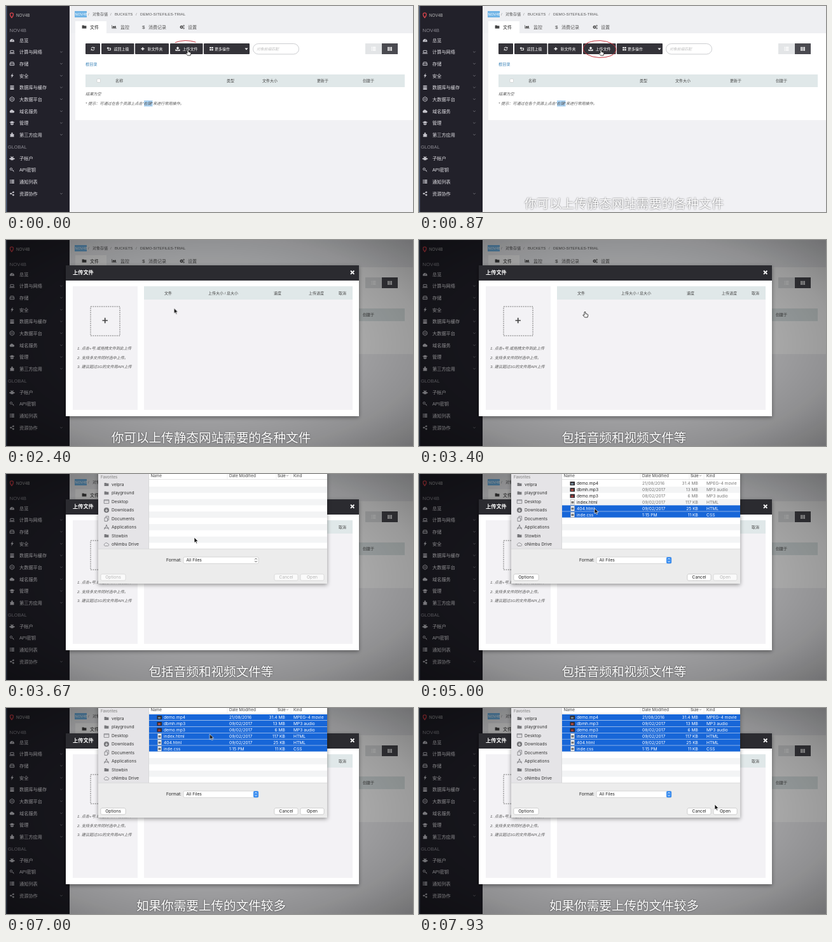
Recreate the animation shown at these times as an HTML page. Size 640x325 px, loop 8000 ms.

```html
<!DOCTYPE html>
<html lang="zh-CN">
<head>
<meta charset="utf-8">
<title>上传文件</title>
<style>
html, body { margin: 0; width: 100%; height: 100%; overflow: hidden; background: #f1f1f4; }
svg { display: block; width: 640px; height: 325px; }
text { font-family: "Liberation Sans", "Noto Sans CJK SC", "Noto Sans CJK", sans-serif; white-space: pre; }
.mac text { font-family: Inter, "Open Sans", sans-serif; }
.sub { font-weight: 300; filter: drop-shadow(0 0 1.2px #0009); }
.move, .circle, .sheet { animation: 8s linear infinite; }
.circle { stroke-dasharray: 1 1.1; animation-name: draw; }
.sheet { animation-name: drop; }
.move { animation-name: move; animation-timing-function: ease-in-out; }
@keyframes draw {
  0% { stroke-dashoffset: .74; }
  8.5%, 100% { stroke-dashoffset: 0; }
}
@keyframes drop {
  0%, 43.8% { transform: translateY(-175px); }
  45.5%, 100% { transform: none; }
}
@keyframes move {
  0%, 24% { transform: translate(286px, 69px); }
  32%, 43% { transform: translate(261px, 113px); }
  45.8%, 48% { transform: translate(296px, 100px); }
  54%, 57% { transform: translate(272px, 64px); }
  60%, 64% { transform: translate(276px, 54px); }
  74%, 84% { transform: translate(289px, 17px); }
  96%, 100% { transform: translate(465px, 152px); }
}
</style>
</head>
<body>
<script>
const LOOP = 8000;
const rules = [];

// Hard cut: visible only between the two times (ms).
function show(from, to, content) {
  const name = `show${rules.length}`;
  const pct = ms => `${ms / LOOP * 100}%`;
  rules.push(`@keyframes ${name}{0%{opacity:0}${pct(from)}{opacity:1}${pct(to)}{opacity:0}}
    .${name}{animation:${name} ${LOOP}ms step-end infinite}`);
  return `<g class="${name}">${content}</g>`;
}

// y is the vertical middle of the text.
const text = (x, y, s, size, fill, extra = '') =>
  `<text x="${x}" y="${y + size * .36}" font-size="${size}" fill="${fill}" ${extra}>${s}</text>`;
const rect = (x, y, w, h, fill, extra = '') =>
  `<rect x="${x}" y="${y}" width="${w}" height="${h}" fill="${fill}" ${extra}/>`;
const line = (d, color, width = 1, extra = '') =>
  `<path d="${d}" fill="none" stroke="${color}" stroke-width="${width}" ${extra}/>`;
const at = (x, y, content, color = '#ddd') =>
  `<g transform="translate(${x} ${y})" fill="${color}" stroke="${color}" stroke-width="0">${content}</g>`;
const solid = d => `<path d="${d}"/>`;
const wire = (d, w = 1) => `<path d="${d}" fill="none" stroke-width="${w}"/>`;
const ITALIC = 'font-style="italic"', BOLD = 'font-weight="700"', MEDIUM = 'font-weight="500"';
const END = 'text-anchor="end"', MIDDLE = 'text-anchor="middle"';

// Icons are drawn around their centre.
const ring = (x, y, r, w = 1) => `<circle cx="${x}" cy="${y}" r="${r}" fill="none" stroke-width="${w}"/>`;
const icon = {
  gauge: solid('M-3.5 2.5A3.6 3.6 0 1 1 3.5 2.5Z') + line('M0 1L1.5-1.5', '#22212a', .7),
  laptop: wire('M-2.6-2.2H2.6V1.2H-2.6ZM-4 2.4H4'),
  disk: wire('M-3.3 0L-2.3-2.4H2.3L3.3 0V2.6H-3.3ZM-3.3 0H3.3'),
  bolt: solid('M1.2-4L-2.2.5H-.3L-1.3 4L2.5-1H.6Z'),
  db: solid('M-3-3H3V-1.5H-3ZM-3-.8H3V.9H-3ZM-3 1.6H3V3.4H-3Z'),
  hex: wire('M0-3.7L3.2-1.8V1.8L0 3.7L-3.2 1.8V-1.8Z') + ring(0, 0, 1.3, .7),
  cloud: solid('M-2.5 2.5A2 2 0 0 1-2.5-1.2A2.6 2.6 0 0 1 2-1A1.8 1.8 0 0 1 2.5 2.5Z'),
  cap: solid('M-4.2-1L0-3L4.2-1L0 1ZM-2.4.6L0 1.8L2.4.6V2.4L0 3.4L-2.4 2.4Z'),
  puzzle: solid('M-3-1H-.8A1.3 1.3 0 1 1 .8-1H3V1A1 1 0 0 0 3 2V3.4H-3V1.8A1 1 0 0 0-3 .2Z'),
  users: solid('M-2-3A1.2 1.2 0 1 1-2-.6ZM2-3A1.2 1.2 0 1 0 2-.6ZM-4 2V0H4V2ZM-2.2 3.2A2.2 2.4 0 0 1 2.2 3.2ZM0-2A1.4 1.4 0 1 1 0 .8A1.4 1.4 0 1 1 0-2Z'),
  key: ring(-1.4, -1.2, 1.7) + wire('M0 0L3 3M1.6 1.6L2.8.6'),
  list: solid('M-3.4-3H-2V-1.6H-3.4ZM-1.2-3H3.4V-1.6H-1.2ZM-3.4-.7H-2V.7H-3.4ZM-1.2-.7H3.4V.7H-1.2ZM-3.4 1.6H-2V3H-3.4ZM-1.2 1.6H3.4V3H-1.2Z'),
  share: wire('M2-2.2L-2 0L2 2.2', .8) + ring(2, -2.2, .7, 1.3) + ring(-2, 0, .7, 1.3) + ring(2, 2.2, .7, 1.3),
  folder: solid('M-3.4-2.6H-.6L.2-1.7H3.4V2.6H-3.4Z'),
  chart: solid('M-3.6 2.6V-3H-3V2H3.8V2.6ZM-2.6 1.6V0L-1-1.8L.5-.3L2-2.2L3.3 1.6Z'),
  gears: ring(-1, .3, 1.7, 1.5) + ring(2.5, -1.8, .9, .8) + ring(2.5, 2.2, .9, .8),
  refresh: wire('M-2.4-.5A2.5 2.5 0 0 1 2-1.5M2.4.5A2.5 2.5 0 0 1-2 1.5', .9) + solid('M2.8-3V-.6H.5ZM-2.8 3V.6H-.5Z'),
  back: wire('M-2-1H2.4V2H-2', 1) + solid('M-3.5-1L-1-3V1Z'),
  plus: wire('M-2.5 0H2.5M0-2.5V2.5', 1.3),
  upload: solid('M-1-.4V1H1V-.4H2.6L0-3.4L-2.6-.4ZM-3.6 1H-1.8V2H1.8V1H3.6V3.2H-3.6Z'),
  grid: solid('M-3.5-2.8H-1.5V-1H-3.5ZM-1-2.8H1V-1H-1ZM1.5-2.8H3.5V-1H1.5ZM-3.5-.6H-1.5V1H-3.5ZM-1-.6H1V1H-1ZM1.5-.6H3.5V1H1.5ZM-3.5 1.4H-1.5V3H-3.5ZM-1 1.4H1V3H-1ZM1.5 1.4H3.5V3H1.5Z'),
  four: solid('M-2.7-2.7H-.4V-.4H-2.7ZM.4-2.7H2.7V-.4H.4ZM-2.7.4H-.4V2.7H-2.7ZM.4.4H2.7V2.7H.4Z'),
  chevron: wire('M-1.8-.9L0 .9L1.8-.9', .7)
};

function sidebar() {
  const items = [
    [54, 'gauge', '总览'], [72.5, 'laptop', '计算与网络', 1], [91, 'disk', '存储', 1],
    [110, 'bolt', '安全', 1], [128.5, 'db', '数据库与缓存', 1], [147, 'hex', '大数据平台', 1],
    [166, 'cloud', '域名服务', 1], [184.5, 'cap', '管理', 1], [203, 'puzzle', '第三方应用', 1],
    [240, 'users', '子帐户'], [258.5, 'key', 'API密钥'], [277, 'list', '通知列表'], [296, 'share', '资源协作', 1]
  ];
  return rect(0, 0, 100, 325, '#22212a') + rect(0, 0, 1.5, 325, '#53627d') +
    line('M9 18.5C5 14 6.2 10.8 9 10.8S13 14 9 18.5Z', '#d8434b', 1.3) +
    text(16, 15, 'NOV4B', 6.3, '#bbb') + text(5.5, 38, 'NOV4B', 7.8, '#8d8c94') +
    text(3, 222.5, 'GLOBAL', 7.4, '#8d8c94') +
    items.map(([y, name, label, more]) => at(9.5, y, icon[name], '#c4c3ca') +
      text(21, y, label, 7.2, '#e2e1e6', MEDIUM) +
      (more ? at(87, y, icon.chevron, '#85848c') : '')).join('');
}

function page() {
  const tabs = [[123, 'folder', '文件', 132], [170, 'chart', '监控', 180], [0, '', '消费记录', 224], [277, 'gears', '设置', 286]];
  const buttons = [
    [125, 23, 'refresh', ''], [150, 51.5, 'back', '返回上级'], [203, 53, 'plus', '新文件夹'],
    [258, 51.5, 'upload', '上传文件'], [311, 72, 'four', '更多操作']
  ];
  const columns = [[172, '名称'], [347, '类型'], [403, '文件大小'], [489, '更新于'], [561, '创建于']];
  return rect(0, 0, 640, 325, '#f1f1f4') + rect(100, 0, 540, 43, '#eeeff2') +
    rect(109, 43, 531, 137, '#fff') + rect(109, 24, 49, 20, '#fff') +
    rect(108, 8, 19, 10, '#72b5e6') + text(108.6, 13, 'NOV4B', 5.8, '#fff') +
    [129, 164, 204].map(x => text(x, 13, '/', 6, '#888')).join('') +
    text(136, 13, '对象存储', 6, '#555') + text(171, 13, 'BUCKETS', 6, '#555') +
    text(211, 13, 'DEMO-SITEFILES-TRIAL', 6.2, '#555') +
    tabs.map(([x, name, label, tx], i) => (name ? at(x, 33, icon[name], '#444') : '') +
      text(tx, 33, label, 7, i ? '#555' : '#222', i ? '' : MEDIUM)).join('') +
    text(214, 33, '$', 8, '#444') +
    buttons.map(([x, w, name, label]) => rect(x, 59, w, 17, '#343339', 'rx="1"') +
      at(label ? x + 12 : x + w / 2, 67.5, icon[name], '#fff') +
      text(label === '更多操作' ? 328 : x + 19.5, 67.5, label, 6, '#fff', MEDIUM)).join('') +
    '<path d="M375.5 66.5h5l-2.5 3z" fill="#fff"/>' +
    rect(388.5, 59.5, 72, 16.5, '#fff', 'rx="8.2" stroke="#bfc0c4" stroke-width=".8"') +
    text(394, 68, '对象前缀匹配', 5.8, '#bbb', ITALIC) +
    rect(565, 59, 26, 17, '#e3e5e7') + at(578, 67.5, icon.list, '#fff') +
    rect(591, 59, 25, 17, '#4a4a50') + at(603.5, 67.5, icon.grid, '#fff') +
    text(125, 92, '根目录', 6.2, '#3b83b8') +
    rect(125, 108, 502, 20, '#e0e8e9') + rect(143, 115, 5.5, 5.5, '#fff', 'rx="1" stroke="#bbb" stroke-width=".5"') +
    columns.map(([x, s]) => text(x, 118, s, 6, '#444')).join('') +
    text(125, 139, '结果为空', 6.2, '#555', ITALIC) +
    rect(217, 149, 13.5, 9.5, '#a9d1f2') +
    text(125, 154, '* 提示：可通过在各个资源上点击"右键"来进行常用操作。', 6.1, '#555', ITALIC) + sidebar();
}

function modal() {
  const columns = [[249, '文件'], [318, '上传大小 / 总大小'], [421, '速度'], [476, '上传进度'], [523, '取消']];
  const hints = ['1. 点击+号,或拖拽文件到此上传', '2. 支持多文件同时选中上传。', '3. 建议超过1G的文件用API上传'];
  return rect(0, 0, 640, 325, 'url(#shade)') +
    rect(94, 40, 461, 238, '#fff', 'filter="url(#shadow)"') + rect(94, 40, 461, 24, '#2b2b30') +
    text(105, 51.5, '上传文件', 8.2, '#fff', BOLD) + line('M542 48.5l5.4 5.4m0-5.4l-5.4 5.4', '#fff', 1.8) +
    rect(105, 73, 102, 195, '#f3f2f5') +
    rect(133, 105, 46, 46, 'none', 'stroke="#555" stroke-width=".8" stroke-dasharray="2 1.4"') +
    line('M151.5 127h8.4m-4.2-4.2v8.4', '#444', 1.7) +
    hints.map((s, i) => text(112, 171 + i * 14.6, s, 6.1, '#555', ITALIC)).join('') +
    rect(217, 73, 328, 195, '#f3f2f5') + rect(217, 73, 328, 21, '#e0e8e9') +
    columns.map(([x, s]) => text(x, 83.5, s, 6, '#444')).join('');
}

const FILES = [
  ['demo.mp4', '21/08/2016', '31.4 MB', 'MPEG-4 movie', 5900],
  ['dbmh.mp3', '09/02/2017', '13 MB', 'MP3 audio', 5700],
  ['demo.mp3', '08/02/2017', '6 MB', 'MP3 audio', 5500],
  ['index.html', '09/02/2017', '117 KB', 'HTML', 5270],
  ['404.html', '09/02/2017', '25 KB', 'HTML', 4800],
  ['inde.css', '1:15 PM', '11 KB', 'CSS', 4530]
];
const ROW = 9.85;

function fileRow([name, date, size, kind, picked], i) {
  const y = 15 + i * ROW;
  const label = (main, dim) => text(248, y, name, 6.7, main) + text(351, y, date, 6.7, dim) +
    text(439, y, size, 6.7, dim, END) + text(452, y, kind, 6.7, dim);
  const thumb = i < 3
    ? rect(237.5, y - 3, 7.5, 6, '#302c30') + rect(239, y - 1, 4, 3, ['#6d8190', '#b34b42', '#a33c3c'][i])
    : rect(238.5, y - 4, 6, 8, '#fafafa', 'stroke="#999" stroke-width=".5"') + rect(239.5, y - 1.5, 4, 3.5, '#777');
  return show(3950, picked, label('#222', '#777')) +
    show(picked, LOOP, rect(225, y - 5, 280, ROW - .5, '#1766d8') + label('#fff', '#fff')) +
    show(3950, LOOP, thumb);
}

function button(x, w, label, enabledAt) {
  const face = rect(x, 158, w, 10, '#fff', 'rx="2" stroke="#c4c4c4" stroke-width=".6"');
  const caption = color => text(x + w / 2, 163, label, 6.7, color, MIDDLE);
  return `<g opacity=".75">${face}</g>` + show(0, enabledAt, caption('#b5b5b5')) +
    show(enabledAt, LOOP, face + caption('#222'));
}

function sheet() {
  const places = ['velpra', 'playground', 'Desktop', 'Downloads', 'Documents', 'Applications', 'Stowbin', 'oNimbu Drive'];
  const glyphs = [
    icon.folder, icon.folder, wire('M-3.8-2.8H3.8V2.8H-3.8ZM-3.8-1.5H3.8', .8),
    ring(0, 0, 2.1, 4) + line('M0-2V2M-1.7.4L0 2L1.7.4', '#eee', 1),
    wire('M-3-1.5H1.5V4H-3ZM-1-1.5V-3.8H3.4V2.3H1.5', .8),
    wire('M-3.5 3.5L.6-4M-.6-4L3.5 3.5M-4 1.2H4', .9), icon.folder,
    wire('M-2.5 2.5A2 2 0 0 1-2.5-1.2A2.6 2.6 0 0 1 2-1A1.8 1.8 0 0 1 2.5 2.5Z', .7)
  ];
  const stripes = Array.from({ length: 11 }, (_, i) =>
    i % 2 ? rect(225, 10 + i * ROW, 280, ROW, '#f3f4f5') : '').join('');
  const head = [[227.5, 'Name'], [351, 'Date Modified'], [427, 'Size'], [452, 'Kind']];
  const stepper = color => line('M391.3 134.8l1.7-1.7l1.7 1.7m-3.4 2.4l1.7 1.7l1.7-1.7', color, .9);
  return `<g class="sheet mac">` + rect(145, -10, 360, 183, '#ececec', 'filter="url(#shadow)"') +
    rect(145, -10, 79.5, 128, '#e5e4e7') + rect(225, -10, 280, 128, '#fff') + stripes +
    line('M145 118.2H505M224.5-10V118M225 8.5H505', '#cfcfcf', .6) +
    line('M348-10V8M425-10V8M448-10V8', '#ddd', .5) +
    head.map(([x, s]) => text(x, 2.5, s, 6.3, '#444', s === 'Size' ? MEDIUM : '')).join('') +
    line('M441 1.8l1.5 1.5l1.5-1.5', '#666', .7) +
    text(149, 5, 'Favorites', 6, '#888', MEDIUM) +
    places.map((s, i) => at(158, 16.5 + i * 13.5, glyphs[i], '#77777b') +
      text(166, 16.5 + i * 13.5, s, 6.7, '#333')).join('') +
    FILES.map(fileRow).join('') +
    text(276, 136, 'Format:', 6.7, '#222', END) +
    rect(279, 131, 118, 10.3, '#fff', 'rx="2" stroke="#c0c0c0" stroke-width=".6"') +
    text(283.5, 136, 'All Files', 6.7, '#222') +
    show(0, 3950, stepper('#444')) +
    show(3950, LOOP, rect(389, 131, 8, 10.3, '#3d8ff0', 'rx="1.8"') + stepper('#fff')) +
    button(149, 39, 'Options', 3950) + button(422, 37, 'Cancel', 3950) + button(463, 37, 'Open', 5400) + '</g>';
}

function cursor() {
  const arrow = '<path d="M0 0V8.6L2 6.8L3.3 9.8L4.7 9.2L3.4 6.3H6.1Z" fill="#111" stroke="#fff" stroke-width=".7"/>';
  const hand = '<path d="M-1 .8Q0-.4 1 .8V3.4L4.2 4.2Q5 4.5 4.8 6L4 9H-.4L-3.3 5.6Q-2.8 4.4-1 5.6Z" fill="#fff" stroke="#111" stroke-width=".8"/>';
  return `<g class="move">${show(0, 1060, hand) + show(1060, 2500, arrow) + show(2500, 3530, hand) + show(3530, LOOP, arrow)}</g>`;
}

const subtitle = (from, to, s) =>
  show(from, to, text(322.5, 312, s, 19.6, '#fff', `class="sub" ${MIDDLE}`));

const scene = page() +
  show(0, 1060, line('M266 57.6A27 14 0 0 1 302 78.4A27 14 0 0 1 266 57.6', '#c4303a', 1, 'class="circle" pathLength="1"')) +
  show(1060, LOOP, modal()) + show(3500, LOOP, sheet()) +
  subtitle(500, 2900, '你可以上传静态网站需要的各种文件') +
  subtitle(2900, 5700, '包括音频和视频文件等') +
  subtitle(5700, LOOP, '如果你需要上传的文件较多') + cursor();

const style = document.createElement('style');
style.textContent = rules.join('\n');
document.head.append(style);
document.body.innerHTML = `<svg viewBox="0 0 640 325">
  <defs>
    <radialGradient id="shade" r=".75">
      <stop offset="0" stop-opacity=".2"/><stop offset=".7" stop-opacity=".4"/><stop offset="1" stop-opacity=".56"/>
    </radialGradient>
    <filter id="shadow" x="-10%" y="-10%" width="120%" height="125%">
      <feDropShadow dx="0" dy="2" stdDeviation="3" flood-opacity=".4"/>
    </filter>
  </defs>${scene}</svg>`;
</script>
</body>
</html>
```
